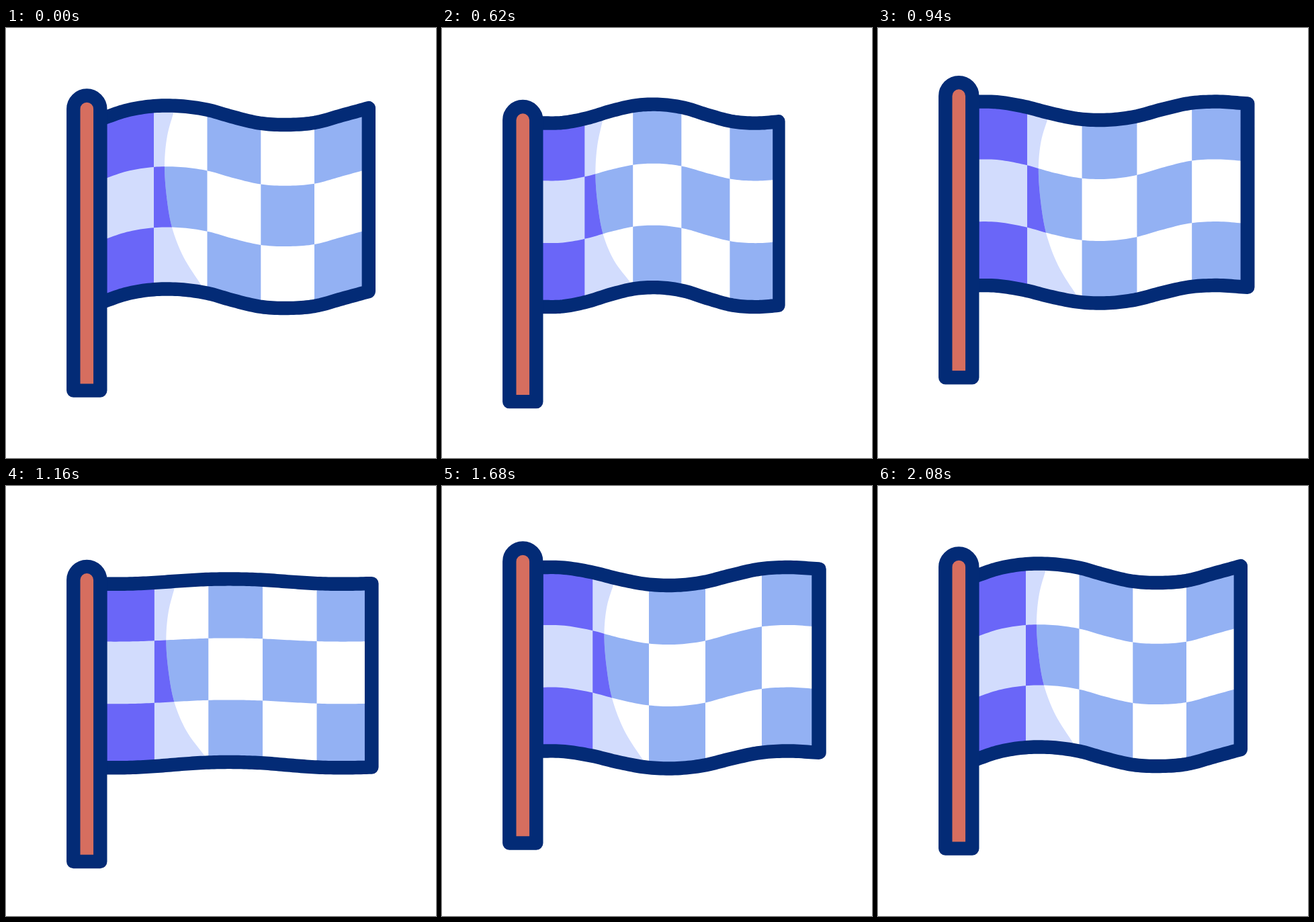
An HTML page with a canvas that plays this animation: 640x640 px, repeating every 2200 ms.

```html
<!DOCTYPE html>
<html lang="en">
<head>
<meta charset="utf-8">
<title>Waving flag</title>
<style>
  html, body { margin: 0; width: 100%; height: 100%; overflow: hidden; background: #fff; }
  canvas { display: block; width: 100vmin; height: 100vmin; }
</style>
</head>
<body>
<canvas></canvas>
<script>
const LOOP = 2200, TICK = 20, START = 200, BEAT = 340;
const NAVY = '#032b76', RED = '#d66e5f', BLUE = '#93b1f3', WHITE = '#fff';
const PURPLE = '#6a66f8', PALE = '#d2dcfd';
const LEFT = 140, RIGHT = 539.8, HEIGHT = 273, GAP = 40, LINE = 20.4;

// Height of the top hem every GAP px: at rest, and the share of each bend.
const rest = [136, 122.6, 116.2, 116.2, 121.8, 133, 142, 144, 140.8, 130, 119];
const bump = [0.01, 0.03, 0.27, 0.65, 0.935, 0.985, 0.81, 0.42, 0.09, 0.005, 0.1];
const columns = [LEFT, 220, 299.5, 379.3, 459, RIGHT];
// Edge of the shaded part: x for each distance below the top hem.
const shade = [[251, 5], [240, 45], [236, 88], [239, 135], [247, 181], [264, 224], [290, 262], [301, 276]];

const canvas = document.querySelector('canvas');
const ctx = canvas.getContext('2d');
const ratio = window.devicePixelRatio || 1;
canvas.width = canvas.height = 640 * ratio;

const mix = (a, b, p) => a + (b - a) * p;
const sine = p => 0.5 - 0.5 * Math.cos(Math.PI * p);
const soft = p => mix(p, sine(p), 0.7);

// Value of a track with one key per beat.
function track(keys, time, lag, ease) {
  const pos = Math.min(Math.max((time - START - lag) / BEAT, 0), keys.length - 1);
  const i = Math.min(Math.floor(pos), keys.length - 2);
  return mix(keys[i], keys[i + 1], ease(pos - i));
}

function spline(a, b, c, d, u) {
  return b + 0.5 * u * (c - a + u * (2 * a - 5 * b + 4 * c - d + u * (3 * (b - c) + d - a)));
}

function sample(list, pos) {
  const last = list.length - 1;
  const i = Math.min(Math.max(Math.floor(pos), 0), last - 1);
  const before = i > 0 ? list[i - 1] : 2 * list[0] - list[1];
  const after = i + 2 <= last ? list[i + 2] : 2 * list[last] - list[last - 1];
  return spline(before, list[i], list[i + 1], after, pos - i);
}

// Piece of cloth between two curves.
function band(upper, lower, x0, x1) {
  const path = new Path2D();
  const n = Math.ceil((x1 - x0) / 4);
  for (let i = 0; i <= n; i++) {
    const x = mix(x0, x1, i / n);
    path.lineTo(x, upper(x));
  }
  for (let i = n; i >= 0; i--) {
    const x = mix(x0, x1, i / n);
    path.lineTo(x, lower(x));
  }
  path.closePath();
  return path;
}

function shadePath(hem, lean) {
  const ds = shade.map(p => p[1]);
  const xs = shade.map(([x, d]) => x + lean * d / HEIGHT);
  const path = new Path2D();
  path.moveTo(LEFT, 0);
  path.lineTo(xs[0], 0);
  for (let i = 0; i <= 56; i++) {
    const x = sample(xs, i / 8);
    path.lineTo(x, hem(x) + sample(ds, i / 8));
  }
  path.lineTo(xs[xs.length - 1], 640);
  path.lineTo(LEFT, 640);
  path.closePath();
  return path;
}

function checks(rows, cloth, light, dark) {
  ctx.fillStyle = light;
  ctx.fill(cloth);
  ctx.fillStyle = dark;
  for (let r = 0; r < 3; r++)
    for (let c = r % 2; c < 5; c += 2)
      ctx.fill(band(rows[r], rows[r + 1], columns[c], columns[c + 1]));
}

function drawFlag(time) {
  const bend = track([0, -1, 1, -1, 1, 0], time, 81, sine);
  const loose = track([0, 1, 1, 1, 1, 0], time, 81, sine);
  const width = track([1, 0.89, 1.0585, 0.89, 1.0585, 1], time, 159, sine);

  const swell = x => sample(bump, (x - LEFT + 4 * bend) / GAP);
  const hem = x => mix(sample(rest, (x - LEFT) / GAP), 127, loose) + bend * (1.8 + 28.3 * swell(x));
  const rows = [
    hem,
    x => hem(x) + mix(90.7, 85.8 + 2.2 * swell(x), loose),
    x => hem(x) + mix(181, 178.5 + 1.5 * swell(x), loose),
    x => hem(x) + HEIGHT - loose * (swell(x) - 0.5)
  ];
  const cloth = band(rows[0], rows[3], LEFT, RIGHT);

  ctx.save();
  ctx.translate(LEFT, 0);
  ctx.scale(width, 1);
  ctx.translate(-LEFT, 0);
  checks(rows, cloth, WHITE, BLUE);
  ctx.save();
  ctx.clip(shadePath(hem, 3.3 * loose - 2.2 * bend));
  checks(rows, cloth, PALE, PURPLE);
  ctx.restore();
  ctx.stroke(cloth);
  ctx.restore();
}

function drawPole() {
  ctx.beginPath();
  ctx.moveTo(100.3, 539.6);
  ctx.lineTo(100.3, 120.5);
  ctx.arc(120.3, 120.5, 20, Math.PI, 0);
  ctx.lineTo(140.3, 539.6);
  ctx.closePath();
  ctx.fillStyle = RED;
  ctx.fill();
  ctx.stroke();
}

function draw(now) {
  const time = Math.floor((now % LOOP) / TICK) * TICK;
  ctx.setTransform(ratio, 0, 0, ratio, 0, 0);
  ctx.fillStyle = WHITE;
  ctx.fillRect(0, 0, 640, 640);
  ctx.strokeStyle = NAVY;
  ctx.lineWidth = LINE;
  ctx.lineJoin = 'round';
  ctx.translate(0, track([0, 24.5, -24.5, 24.5, -11.5, 0], time, 0, soft));
  drawFlag(time);
  drawPole();
}

let begin;
function frame(now) {
  begin ??= now;
  draw(now - begin);
  requestAnimationFrame(frame);
}
draw(0);
requestAnimationFrame(frame);
</script>
</body>
</html>
```
